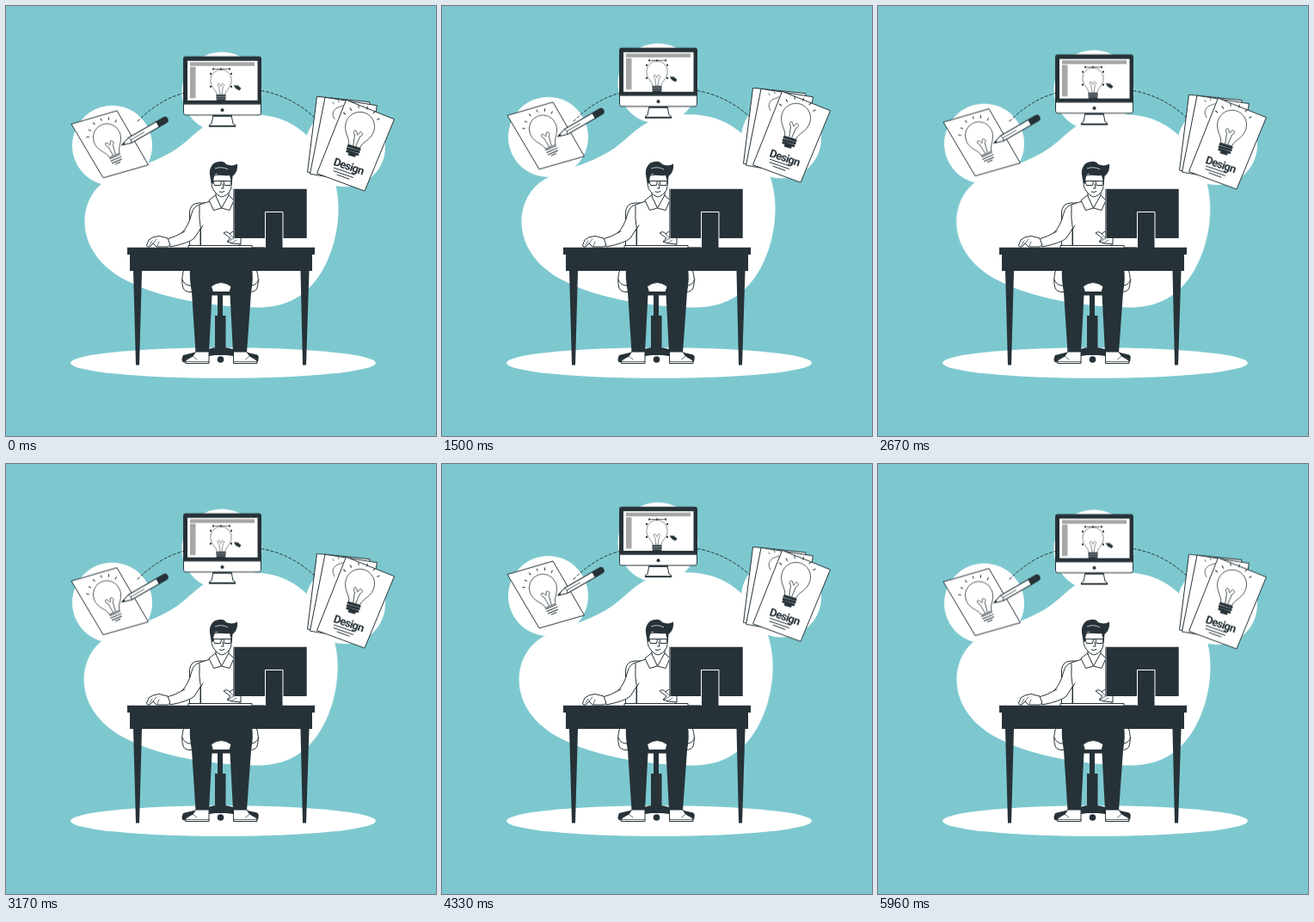
An HTML page without scripts that plays this animation: 500 px wide and 500 px high, repeating every 6000 ms.

```html
<!DOCTYPE html>
<html lang="en">
<head>
<meta charset="utf-8">
<title>Designer at work</title>
<style>
  html, body { margin: 0; width: 100%; height: 100%; overflow: hidden; background: #7dc8cf; }
  svg { display: block; width: 100vw; height: 100vh; }
  .line { fill: none; stroke: #263238; stroke-width: 1; stroke-linecap: round; stroke-linejoin: round; }
  .body { fill: #fff; stroke: #263238; stroke-width: 1; stroke-linejoin: round; }
  .dark { fill: #263238; }
  .white { fill: #fff; }
  .grey { fill: #a6a6a6; }
  .thin { stroke-width: .7; }
  .title { font: 600 13px Roboto, "Liberation Sans", sans-serif; font-stretch: 75%; letter-spacing: -.7px; fill: #263238; }
  .float { animation: float 3s linear infinite; }
  .drift { animation: drift 6s linear infinite; }
  @keyframes float { 50% { transform: translateY(-10px); } }
  @keyframes drift {
    25% { transform: translateX(1px); }
    70% { transform: translateX(-2px); }
  }
</style>
</head>
<body>
<svg viewBox="0 0 500 500" xmlns="http://www.w3.org/2000/svg">
  <defs>
    <g id="bulb">
      <path class="body thin" d="M-6.5 22C-6.500 15-16 11-16-.5A16 16 0 0 1 16-.5C16 11 6.500 15 6.500 22Z"/>
      <path class="line thin" d="M-1.500 21L-3 10C-6 8-5 4-3 5S-1 9 0 9S1 4 3 5S6 8 3 10L1.500 21"/>
    </g>
    <path id="cap" d="M-6.500 23.500H6.500M-6.500 26.500H6.500M-6 29.500H6M-3 32H3"/>
    <path id="rays" class="line" d="M-19-9L-21.500-10.200M-14-15L-16-17M-7-20L-8-22.500M2-21V-23.500M10-18.500L11.200-21M16-13L18-14.700"/>
    <g id="shoe">
      <path class="body" d="M220.500 402H236V415.500H208.500Q207.500 412 212 410Q218 408 220.500 402Z"/>
      <path class="line thin" d="M209 413.500H236M217 407L222 411"/>
    </g>
  </defs>

  <rect width="500" height="500" fill="#7dc8cf"/>
  <ellipse class="white" cx="252.500" cy="415" rx="177.500" ry="17.800"/>

  <path class="drift white" d="M91.500 252C91 229 103 207 127 197C151 187 177 181 200 165C215 154 224 142 241 134
    C258 126 288 123 313 129.500C341 137 360 158 373 180C382 197 387 218 386.500 238C386 266 377 297 361 318
    C344 341 321 351 290 350.500C254 350 192 344 148 323C111 307 92 280 91.500 252Z"/>

  <g class="float white">
    <circle cx="123.500" cy="162.300" r="46.500"/>
    <circle cx="251" cy="100" r="46.500"/>
    <circle cx="394.500" cy="163.800" r="46.500"/>
  </g>

  <path class="line" stroke-dasharray="3 2.600" d="M153 134Q178 109 206 101.500M297 98.500Q333 105 360 131"/>

  <g transform="translate(0 .7)">
    <!-- sketch and pencil -->
    <g class="float">
      <path class="body" d="M76 136.500L129 121L165.500 184L113 199Z"/>
      <g transform="translate(117.500 152.500) rotate(-23)">
        <use href="#bulb"/>
        <use href="#cap" class="line"/>
        <use href="#rays"/>
      </g>
      <g transform="translate(134.500 161) rotate(-30)">
        <path class="body" d="M0 0L11-3.500H49V3.500H11Z"/>
        <path class="line thin" d="M11-3.500L12.500 0L11 3.500M12.500 0H30"/>
        <path class="dark" d="M0 0L4-1.300V1.300ZM48-4H58Q62-4 62 0T58 4H48Z"/>
      </g>
    </g>

    <!-- floating computer -->
    <g class="float">
      <path class="body" d="M241 126H262L264 136Q267 137 267 139H236Q236 137 239 136Z"/>
      <path class="dark" d="M241 126H262L262.500 128H240.500ZM236 138H267V140H236Z"/>
      <path class="body" d="M206.500 112H296.500V123.500Q296.500 126 294 126H209Q206.500 126 206.500 123.500Z"/>
      <path class="dark" d="M209 57.700H294Q297 57.700 297 60.700V113.700H206V60.700Q206 57.700 209 57.700Z"/>
      <path class="white" d="M211 63H292.500V109H211Z"/>
      <path class="grey" d="M214 64.500H289V69H214ZM214 70H220.500V106.500H214Z"/>
      <circle class="dark" cx="251.500" cy="120.300" r="2"/>
      <g transform="translate(250 85.700) scale(.76)">
        <use href="#bulb"/>
        <use href="#cap" stroke="#263238" stroke-width="2.500" stroke-linecap="round"/>
      </g>
      <path class="line thin" d="M241 72.500H260"/>
      <path class="dark" d="M240 71.500H242V73.500H240ZM249 71.500H251V73.500H249ZM259 71.500H261V73.500H259ZM237 77H239V79H237ZM261 77H263V79H261ZM237 92H239V94H237ZM261 92H263V94H261Z"/>
      <path class="dark" d="M264.500 91.500L269.500 91.500L273.500 95L271.500 97.500L267.500 95.500Z"/>
    </g>

    <!-- printed sheets -->
    <g class="float">
      <path class="body" d="M361.500 104.500L423 111L412 199L350.500 192.500Z"/>
      <path class="body" d="M371 105.500L431.500 115L414 205L353.500 194.500Z"/>
      <path class="line thin" d="M382 131Q377 124 384 118L392 115M381 113L380 111M387 111L386.500 109"/>
      <path class="body" d="M395.500 108.500L451.500 131L417 214.500L361.500 194Z"/>
      <g transform="translate(411.500 140) rotate(16) scale(1.060)">
        <use href="#bulb"/>
        <use href="#cap" stroke="#263238" stroke-width="2.700" stroke-linecap="round"/>
        <use href="#rays"/>
      </g>
      <text class="title" transform="translate(380 184) rotate(19)">Design</text>
      <path class="line" d="M381.500 187.500L405 195.500M381 191L403.500 198.700M385 195.500L399 200.500"/>
    </g>
  </g>

  <!-- chair -->
  <path class="body" d="M225 229Q214 229 213.500 240V281H232V229Z"/>
  <path class="body" d="M207 306H291Q295 318 292 328Q290 332.500 284 332.500H214Q208 332.500 206 328Q203 318 207 306Z"/>
  <path class="line" d="M205 318Q207 324 213 325H286Q292 324 294 318"/>
  <path class="dark" d="M238 332H261V336.500H238ZM246 336H252V361H246ZM243 360H255.500V399H243ZM243 397H255.500L292 405.500Q295 408 293 410.500L256 406H243L207 411.500Q204 410 206 406Z"/>
  <g class="dark">
    <circle cx="208" cy="411" r="3.500"/>
    <circle cx="249.500" cy="411" r="3.800"/>
    <circle cx="290" cy="411" r="3.500"/>
  </g>

  <!-- legs -->
  <path class="dark" d="M214 306H286Q288 316 285 333L280 403H264L260.500 336Q259 324 250 321.500Q241 324 239.500 336L236 403H220.500L216 333Q213 317 214 306Z"/>
  <path class="body" d="M238.500 326Q250 317 262 326L260 332.500H240.500Z"/>
  <use href="#shoe"/>
  <use href="#shoe" transform="matrix(-1 0 0 1 500.500 0)"/>

  <!-- upper body -->
  <path class="body" d="M237 227L225 231Q218 233 216 241Q212 257 204 264Q198 268 187 271L191 280Q212 276 219 270L226 259V281H275V228L262 225Z"/>
  <path class="line" d="M225 232Q224 247 226.500 260V280M226 260L229 255M204 264L208 262"/>
  <path class="body" d="M244 213V223L250.500 235L259 224V213Z"/>
  <path class="body" d="M243.500 220L236 226L241.500 237.500L250.500 235ZM259 220L265 226L260 237.500L250.500 235Z"/>
  <path class="body" d="M239 197Q238 211 242 215Q246 221 250.500 222Q257 221 261 214Q263 208 262.500 195Z"/>
  <path class="dark" d="M239.500 207Q235 193 238 188Q241 181 248 181Q253 180 256 184Q263 187 269 183.500Q270 193 263.500 198L262.500 206L260 197Q250 198 244 195Q241 198 241 206Z"/>
  <path d="M243 189Q251 186 258 190" fill="none" stroke="#fff" stroke-width=".7"/>
  <path class="body" d="M241 203.500H250.500L249.500 208.500H242.500ZM253 203.500H262L261 208.500H254Z"/>
  <path class="line" stroke-width="1.500" d="M240 203.500H262.500M252 207L253 212H250.500M248 216Q251 217.500 254 215.500"/>
  <path class="body" d="M188 270L178 267.500Q170 268 166 272L163.500 278Q164 281 167 280L171 276L175 280H188L191 278Z"/>
  <path class="line thin" d="M171 276L175 271M176 279L178 274M167 278L170 273"/>
  <path class="body" d="M272 269H302V281H272Z"/>
  <path class="body" d="M253 264Q257 261 260 265L264 262L273 268V277L263 276L257 274L261 270Z"/>
  <path class="line thin" d="M260 265L265 270M258 274L265 270M262 276L268 272"/>

  <!-- desk -->
  <path class="body" d="M212 278.500H286V281.500H212Z"/>
  <path class="dark" d="M264 212.700H349.700V270H264Z"/>
  <path d="M265 213V270" stroke="#fff" stroke-width=".7"/>
  <path class="dark" d="M301.500 239.500H322V282H301.500Z"/>
  <path d="M301.500 281V239.500H322V281" fill="none" stroke="#fff" stroke-width="1"/>
  <path class="dark" d="M141 280.700H359V289H356V308H352.500L349 417.500H345L342.500 308H158L155 417.500H151L148 308H144V289H141Z"/>
</svg>
</body>
</html>
```
